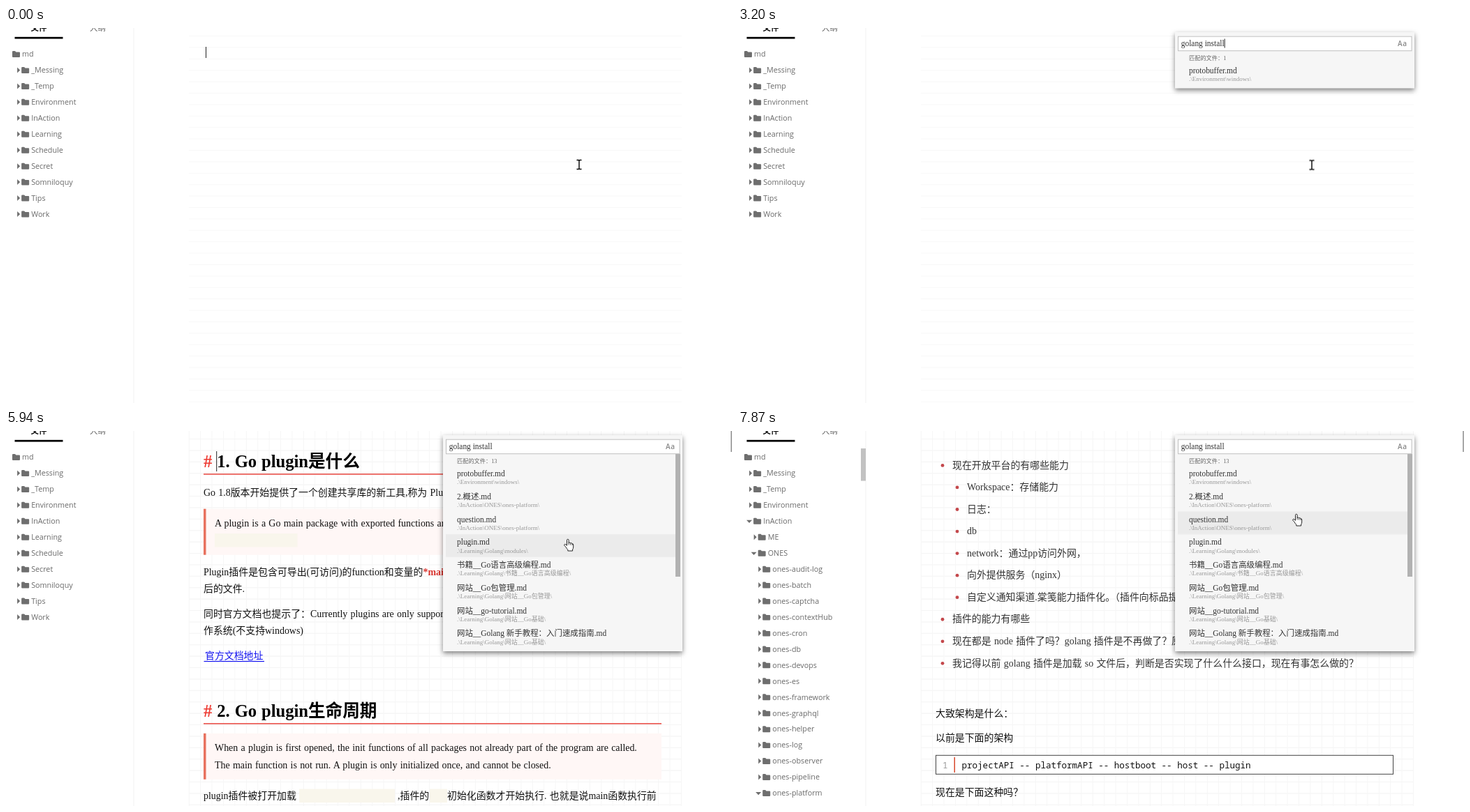
An HTML page that plays this animation: 1040 by 538 pixels, repeating every 8 s.

```html
<!DOCTYPE html>
<html lang="zh-CN">
<head>
<meta charset="utf-8">
<title>Note search</title>
<style>
html, body { margin: 0; width: 100%; height: 100%; overflow: hidden; background: #fff; }
svg { display: block; width: 100%; height: 100%; }
text { white-space: pre; font: 11.45px "Liberation Serif", "Noto Sans CJK SC", serif; fill: #333; }
.tab { font-family: "Noto Sans CJK SC", sans-serif; fill: #666; }
.tab.on { font-weight: 700; fill: #111; }
.tree { font: 10.75px "Open Sans", "Noto Sans", sans-serif; fill: #6a6a6a; }
.icon { fill: #6e6e6e; }
.doc { font-size: 13.92px; word-spacing: .8px; fill: #111; }
.item { fill: #333; }
.head { font-size: 24.6px; font-weight: 700; word-spacing: .8px; fill: #000; }
.mark { fill: #ee3c34; }
.strong { font-weight: 700; fill: #d8322c; }
.link { fill: #1414f0; }
.code { font: 12.85px "Noto Sans Mono", "DejaVu Sans Mono", monospace; fill: #ff4a12; }
.block { font-size: 12.55px; fill: #111; }
.num { fill: #999; }
.path { font-size: 9px; fill: #999; }
.count { font-size: 8.2px; fill: #666; }
.case { font: 600 10px "Open Sans", sans-serif; letter-spacing: .6px; fill: #888; }
.panel { fill: #f6f6f6; filter: drop-shadow(0 3px 3.5px rgba(0, 0, 0, .5)); }
</style>
</head>
<body>
<svg id="stage" viewBox="0 0 1040 538"></svg>
<script>
const LOOP = 8000;
const stage = document.getElementById('stage');

function add(tag, attrs = {}, parent = stage) {
  const node = document.createElementNS('http://www.w3.org/2000/svg', tag);
  for (const k in attrs) node.setAttribute(k, attrs[k]);
  parent.append(node);
  return node;
}
const group = (parent = stage) => add('g', {}, parent);
const rect = (x, y, width, height, fill, parent) => add('rect', { x, y, width, height, fill }, parent);
const path = (d, attrs, parent) => add('path', { d, ...attrs }, parent);

function text(x, y, str, cls, parent) {
  const node = add('text', { x, y, class: cls }, parent);
  node.textContent = str;
  return node;
}
function span(node, str, cls) {
  add('tspan', { class: cls }, node).textContent = str;
}

// frames: [time, value] pairs, each held until the next
function hold(node, prop, frames) {
  const last = frames[frames.length - 1];
  const keys = [...frames, [LOOP, last[1]]].map(([t, v]) => (
    { offset: t / LOOP, [prop]: v, easing: 'step-end' }));
  node.animate(keys, { duration: LOOP, iterations: Infinity }).startTime = 0;
  return node;
}
// times alternate on, off, on ...
function show(node, ...times) {
  const frames = times.map((t, i) => [t, i % 2 ? 0 : 1]);
  if (times[0] > 0) frames.unshift([0, 0]);
  return hold(node, 'opacity', frames);
}

// ---------- page grid ----------
const STEP = 16.4;
function grid(vertical, color, parent) {
  let d = '';
  if (vertical) for (let x = 262.3; x < 969; x += STEP) d += `M${x} 0V538`;
  else for (let y = 11.5; y < 538; y += STEP) d += `M262 ${y}H968`;
  path(d, { stroke: color, 'stroke-width': 1 }, parent);
}
grid(false, '#f8f8f8');
const openGrid = show(group(), 5940);
grid(false, '#f5f5f5', openGrid);
grid(true, '#f6f6f6', openGrid);

// ---------- sidebar ----------
rect(182.5, 0, 1, 538, '#f2f2f2');
text(35.5, 4, '文件', 'tab on');
text(120, 4, '大纲', 'tab');
rect(12.5, 12.8, 69, 2.7, '#000');

const FOLDER = 'M0 1.2Q0 0 1 0H4L5.3 1.5H10Q11 1.5 11 2.5V8Q11 9 10 9H1Q0 9 0 8Z';
function treeRow(i, level, label, open, parent) {
  const y = 37.5 + 22.95 * i, x = 9 + 6.55 * level + (level ? 6.6 : 0);
  path(FOLDER, { class: 'icon', transform: `translate(${x} ${y - 4.5})` }, parent);
  text(x + 14, y + 3.8, label, 'tree', parent);
  if (!level) return;
  path(open ? `M${x - 10} ${y - 1.5}h8l-4 4.3z` : `M${x - 6} ${y - 4}v8l4 -4z`, { class: 'icon' }, parent);
}
// a leading ">" per level, a trailing "*" for an open folder
function tree(list, first, parent) {
  list.split(',').forEach((s, i) => {
    const level = s.lastIndexOf('>') + 1, open = s.endsWith('*');
    treeRow(first + i, level, s.slice(level, open ? -1 : undefined), open, parent);
  });
}
tree('md,>_Messing,>_Temp,>Environment', 0);

const closed = show(group(), 0, 6400);
tree('>InAction,>Learning,>Schedule,>Secret,>Somniloquy,>Tips,>Work', 4, closed);

const learning = show(group(), 6400, 7410);
tree('>InAction,>Learning*,>>_Messing,>>_Other,>>Android Debug Bridge,>>Appium,>>Assembly Language,' +
  '>>Beego,>>Boostrap,>>C Plus Plus,>>Canal,>>Cascading Style Sheets,>>Celery,>>Charles,' +
  '>>Chrome DevTools,>>Clang,>>ClickHouse,>>Colly,>>Data Structures', 4, learning);
rect(176, 25, 7, 60, '#c2c2c2', learning);

const action = show(group(), 7410);
const modules = 'audit-log,batch,captcha,contextHub,cron,db,devops,es,framework,graphql,helper,log,observer,pipeline,platform*';
tree('>InAction*,>>ME,>>ONES*,' + modules.split(',').map(s => '>>>ones-' + s).join() + ',>>>>docs', 4, action);
rect(176, 25, 7, 46.5, '#c2c2c2', action);

// ---------- plugin document ----------
function heading(y, str, g) {
  const node = text(283, y, '', 'head', g);
  span(node, '# ', 'mark');
  span(node, str, '');
  rect(283, y + 9, 656, 1.5, '#e8463f', g);
}
function quote(y, g) {
  rect(283, y, 656, 66, '#fff7f6', g);
  rect(283, y, 3.5, 66, '#e8725f', g);
}
const chip = (x, y, w, g) => rect(x, y - 14.5, w, 19.5, '#f9f6ec', g);
function code(x, y, str, w, g) {
  chip(x - 2.5, y, w, g);
  text(x, y, str, 'code', g);
}

function pluginDoc(ready) {
  const g = group();
  heading(52.2, '1. Go plugin是什么', g);
  text(283, 93, 'Go 1.8版本开始提供了一个创建共享库的新工具,称为 Plugin', 'doc', g);
  quote(111.7, g);
  text(299, 137.3, 'A plugin is a Go main package with exported functions and', 'doc', g);
  if (ready) code(299, 162, 'buildmode=plugin', 127, g);
  else chip(299, 161.5, 118.5, g);
  const line = text(283, 206.6, 'Plugin插件是包含可导出(可访问)的function和变量的', 'doc', g);
  span(line, '*main*', 'strong');

  const low = add('g', { transform: `translate(0 ${ready ? 0 : -.9})` }, g);
  if (ready) {
    code(283, 231.6, 'buildmode=plugin', 127, low);
    text(410, 231.6, ')之后的文件.', 'doc', low);
  } else {
    text(283, 231.6, '后的文件.', 'doc', low);
  }
  text(283, 267.6, '同时官方文档也提示了：Currently plugins are only supported', 'doc', low);
  text(283, 292, '作系统(不支持windows)', 'doc', low);
  text(285, 328, '官方文档地址', 'doc link', low);
  rect(283.5, 330.8, 86.5, 1.2, '#1414f0', low);
  heading(411, '2. Go plugin生命周期', low);
  quote(434.7, low);
  text(299, 460, 'When a plugin is first opened, the init functions of all packages not already part of the program are called.', 'doc', low);
  text(299, 484.7, 'The main function is not run. A plugin is only initialized once, and cannot be closed.', 'doc', low);
  text(283, 529, 'plugin插件被打开加载', 'doc', low);
  const tail = '初始化函数才开始执行. 也就是说main函数';
  if (ready) {
    code(423, 529, 'plugin.Open("***.so")', 168, low);
    text(592.5, 529, ',插件的', 'doc', low);
    code(641, 529, 'init', 35, low);
    text(675, 529, tail, 'doc', low);
  } else {
    chip(420, 529, 137, low);
    text(561, 529, ',插件的', 'doc', low);
    chip(607, 529, 25, low);
    text(632, 529, tail + '执行前', 'doc', low);
  }
  return g;
}
show(pluginDoc(false), 5940, 6000);
show(pluginDoc(true), 6000, 7410);

// ---------- question document ----------
const question = show(group(), 7410);
[
  '现在开放平台的有哪些能力',
  '>Workspace：存储能力',
  '>日志：',
  '>db',
  '>network：通过pp访问外网，',
  '>向外提供服务（nginx）',
  '>自定义通知渠道.棠笺能力插件化。（插件向标品提供',
  '插件的能力有哪些',
  '现在都是 node 插件了吗？golang 插件是不再做了？原因',
  '我记得以前 golang 插件是加载 so 文件后，判断是否实现了什么什么接口，现在有事怎么做的？'
].forEach((s, i) => {
  const y = 48.6 + 31.55 * i, sub = s[0] === '>', x = sub ? 328 : 307;
  add('circle', { cx: x - 14, cy: y + .8, r: 2.4, fill: '#c4484c' }, question);
  text(x, y + 5, sub ? s.slice(1) : s, 'doc item', question);
});
text(283, 409.6, '大致架构是什么：', 'doc', question);
text(283, 445, '以前是下面的架构', 'doc', question);
add('rect', { x: 283.5, y: 465.3, width: 655, height: 27, fill: '#fff', stroke: '#444' }, question);
text(293, 483.6, '1', 'code block num', question);
rect(309.5, 468, 1.5, 22, '#d8482c', question);
show(text(320.5, 483.6, 'projectAPI -- platformAPI -- hostboot -- host -- plugin', 'code block', question), 7680);
text(283, 522.6, '现在是下面这种吗？', 'doc', question);

show(rect(1038, 0, 2, 30, '#a8a8a8'), 5940);

// ---------- carets in the page ----------
show(rect(286, 27, 1, 16, '#222'), 60, 390);
show(rect(301.2, 29, 1, 29, '#222'), 5940, 6470, 6930, 7130);
show(rect(306, 41, 1, 16, '#222'), 7410, 7870);

// ---------- search panel ----------
const search = show(group(), 390);
const panel = (h, ...times) => show(add('rect', { x: 626, y: 6, width: 343, height: h, class: 'panel' }, search), ...times);
panel(31, 390, 3200);
panel(80.5, 3200, 3420);
panel(179, 3420, 3510);
panel(310, 3510);

const ROW = 32.75;
const hover = add('rect', { x: 630, y: 50, width: 329, height: ROW, fill: '#ebebeb' }, search);
show(hover, 3510);
hold(hover, 'transform', [[0, 4], [4660, 3], [6470, 2]].map(([t, n]) => [t, `translateY(${n * ROW}px)`]));

[[1, 3200, 3420], [4, 3420, 3510], [9, 3510, 3610], [13, 3610]].forEach(([n, ...times]) =>
  show(text(646, 46, '匹配的文件：' + n, 'count', search), ...times));

const GO = 'Learning\\Golang\\', ONE = 'InAction\\ONES\\ones-platform';
[
  ['protobuffer', 'Environment\\windows'],
  ['2.概述', ONE],
  ['question', ONE],
  ['plugin', GO + 'modules'],
  ['书籍__Go语言高级编程', GO + '书籍__Go语言高级编程'],
  ['网站__Go包管理', GO + '网站__Go包管理'],
  ['网站__go-tutorial', GO + '网站__Go基础'],
  ['网站__Golang 新手教程：入门速成指南', GO + '网站__Go基础']
].forEach(([name, dir], i) => {
  const g = show(group(search), i < 1 ? 3200 : i < 4 ? 3420 : 3510);
  text(646, 65.2 + ROW * i, name + '.md', '', g);
  text(646, 76.4 + ROW * i, `.\\${dir}\\`, 'path', g);
});
show(rect(959, 33, 7, 176, '#b2b2b2', search), 3510);

add('rect', { x: 630.5, y: 12.2, width: 334.5, height: 20.5, fill: '#fff', stroke: '#c0c0c0' }, search);
text(945, 25.8, 'Aa', 'case', search);

// ---------- typing ----------
const query = 'golang install';
const typed = [390, 820, 920, 1120, 1270, 1370, 1470, 1610, 1740, 1870, 2010, 2140, 2270, 2400, 2540];
typed.forEach((start, n) => {
  const done = n === query.length, until = done ? [] : [typed[n + 1]];
  const node = text(634.7, 26, query.slice(0, n), '', search);
  const caret = rect(634.7 + (n ? node.getComputedTextLength() : 0), 15.5, 1, 13, '#222', search);
  show(node, start, ...until);
  show(caret, start, ...(done ? [3270, 3610, 4140, 4660, 5210] : until));
});

// ---------- pointer ----------
function click(x, y, from, to) {
  show(add('circle', { cx: x, cy: y, r: 10, fill: 'rgba(255,255,0,.47)' }), from, to);
}
click(805, 155, 5470, 5610);
click(800, 119, 7130, 7260);

const moves = [[0, 821, 196], [730, 822, 196.5], [4600, 816, 182], [4660, 808, 162], [4730, 805, 155], [6470, 802, 135], [6540, 800, 119]];
const pointer = group();
hold(pointer, 'transform', moves.map(([t, x, y]) => [t, `translate(${x}px, ${y}px)`]));

show(path('M-3.5 -6.5H-1Q0 -6.5 0 -5.5Q0 -6.5 1 -6.5H3.5M0 -6V6M-3.5 6.5H-1Q0 6.5 0 5.5Q0 6.5 1 6.5H3.5',
  { fill: 'none', stroke: '#000', 'stroke-width': 1.4 }, pointer), 0, 3510);

const hand = show(group(pointer), 3510);
path('M-1.5 1.5Q-1.5 .3 -.2 .3Q1.1 .3 1.1 1.5V6Q1.2 5 2.3 5T3.6 6.3Q3.8 5.5 4.8 5.6T6 7Q7.5 6.4 7.7 8V12Q7.6 13.6 6.6 15V17H-.2V15.3Q-2 13.5 -3.2 11.2L-5.1 9.2Q-5.7 7.7 -4.5 7.4Q-3.2 7.2 -1.5 9.3Z',
  { fill: '#fff', stroke: '#222', 'stroke-width': 1, 'stroke-linejoin': 'round' }, hand);
path('M1.1 6V8.5M3.6 6.3V8.7M6 7V9', { fill: 'none', stroke: '#222', 'stroke-width': .8 }, hand);
</script>
</body>
</html>
```
